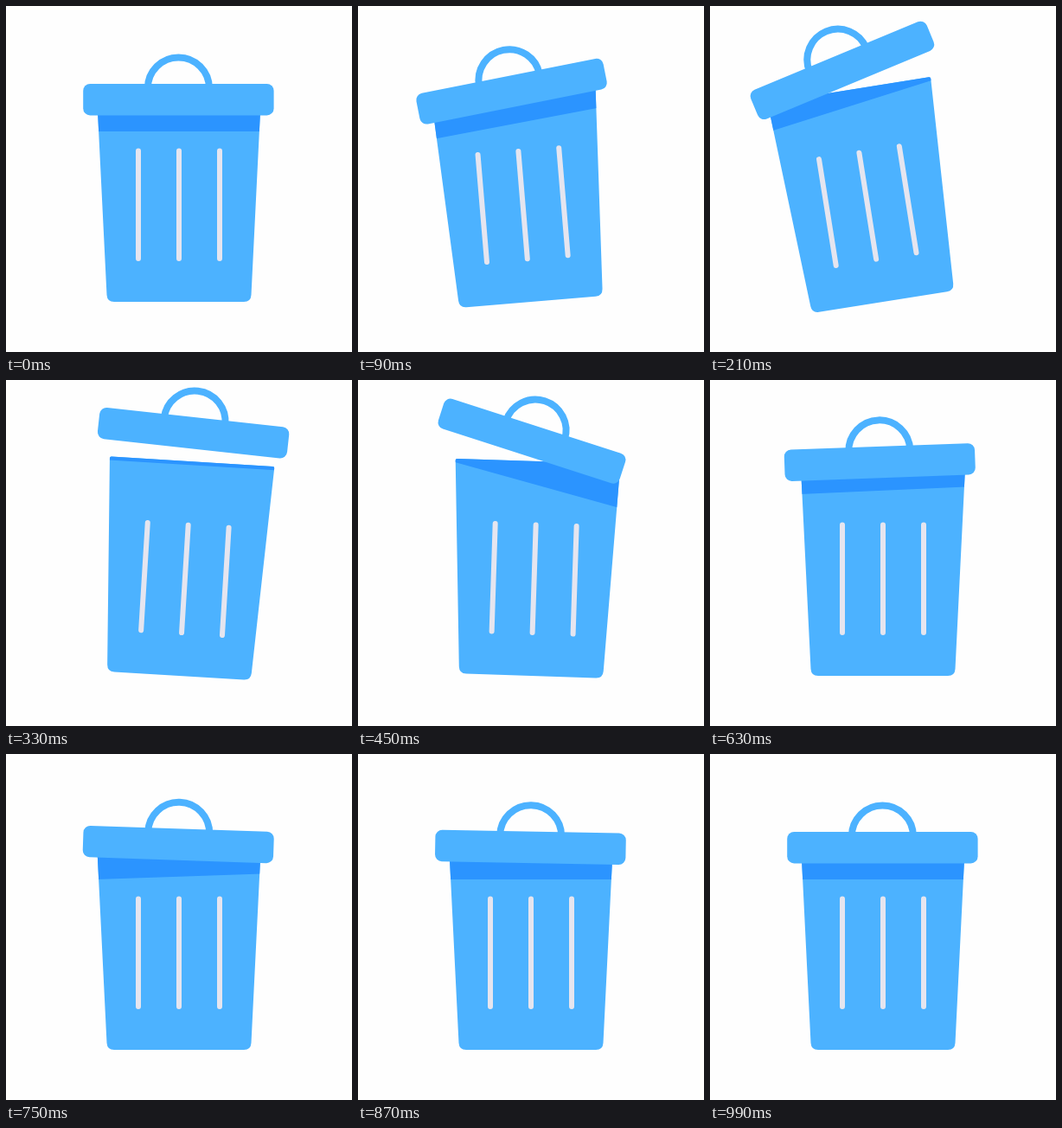
An HTML page that plays this animation: 400x400 px, repeating every 3020 ms.

```html
<!DOCTYPE html>
<html lang="en">
<head>
<meta charset="utf-8">
<title>Trash can</title>
<style>
  html, body { margin: 0; width: 100%; height: 100%; overflow: hidden; background: #fefefe; }
  svg { display: block; width: 100%; height: 100%; }
</style>
</head>
<body>
<svg viewBox="0 0 400 400">
  <defs>
    <path id="shape" d="M106.7 93.8H293.3Q295.4 93.8 295.3 95.8L283.5 334Q283 342 275 342H125Q117 342 116.5 334L104.7 95.8Q104.6 93.8 106.7 93.8Z"/>
    <clipPath id="inside"><use href="#shape"/></clipPath>
  </defs>
  <g id="can">
    <use href="#shape" fill="#4cb2ff"/>
    <path id="shade" fill="#2b94ff" clip-path="url(#inside)"/>
    <path d="M153 167.5V292M200 167.5V292M247 167.5V292" stroke="#e5e5ef" stroke-width="6" stroke-linecap="round"/>
    <g id="lid" fill="#4cb2ff">
      <path d="M-35.5 -5V-13.2A35.5 35.5 0 0 1 35.5 -13.2V-5" fill="none" stroke="#4cb2ff" stroke-width="8"/>
      <rect x="-110.2" y="-18.2" width="220.4" height="36.4" rx="8"/>
    </g>
  </g>
</svg>
<script>
const LOOP = 3020, STEP = 30, END = 990;
const LIFT = 47.5, SHADE_Y = 145, SHADE_RISE = 47;
const [can, lid, shade] = ['can', 'lid', 'shade'].map(id => document.getElementById(id));

const smooth = u => u * u * (3 - 2 * u);

function draw(time) {
  const t = Math.min(END, Math.floor(time % LOOP / STEP) * STEP);
  const progress = (from, to) => Math.max(0, Math.min(1, (t - from) / (to - from)));
  const ease = (from, to) => smooth(progress(from, to));
  const bump = (from, peak, to) => ease(from, peak) - ease(peak, to);

  // The can rocks left, then right.
  const tilt = -10 * bump(0, 185, 345) + 3.85 * bump(185, 345, 550);

  // The lid flies up, settles slowly and swings less and less.
  const fall = smooth(1 - (1 - progress(330, END)) ** 1.75);
  const lift = LIFT * (ease(0, 295) - fall);
  const shift = -3.6 * bump(0, 210, 330) - 7.2 * bump(330, 450, 780);
  const swing = -14 * bump(0, 190, 450) + 16 * bump(190, 450, 640)
    - 2.2 * bump(450, 640, 760) + 2 * bump(640, 760, END);

  // Each end of the shade opens and closes; the right one bounces once.
  const left = SHADE_RISE * (ease(120, 330) - ease(450, 725));
  const right = SHADE_RISE * (ease(0, 200) - ease(340, 455)) + 22 * bump(450, 610, 830);

  can.setAttribute('transform', `rotate(${tilt} 200 342)`);
  lid.setAttribute('transform', `translate(${199.4 + shift} ${108.2 - lift}) rotate(${swing})`);
  shade.setAttribute('d', `M104 93H296V${SHADE_Y - right}L104 ${SHADE_Y - left}Z`);
}

const start = performance.now();
function tick() {
  draw(performance.now() - start);
  requestAnimationFrame(tick);
}
tick();
</script>
</body>
</html>
```
